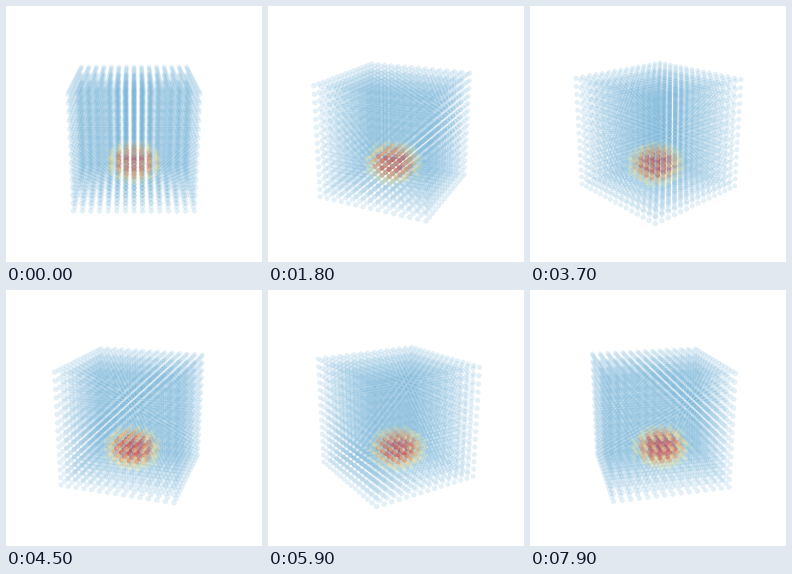
Write a matplotlib script that moves like this. It is 256 px wide and 256 px high and loops after 8 s.

```python
import numpy as np
import matplotlib.pyplot as plt
from matplotlib.animation import FuncAnimation
from matplotlib.colors import LinearSegmentedColormap

SIZE, DPI = 256, 100
FRAMES, INTERVAL = 80, 100
TURN = np.radians(3.6)            # rotation per frame
ELEV = np.arcsin(1 / 3)
DIST, FOCAL = 8.73, 490           # in half cube sides, in pixels
DOT = 5.0                         # dot diameter at the cube centre, pixels

# Cube lattice: x right, y towards the viewer, z up
axis = np.linspace(-1, 1, 15)
x, y, z = (g.ravel() for g in np.meshgrid(axis, axis, axis, indexing="ij"))

# Hot spot near the floor
q = np.sqrt((x / .5) ** 2 + ((y + .05) / .5) ** 2 + ((z + .55) / .36) ** 2)
heat = np.clip(1 - q / 1.12, 0, 1)
cmap = LinearSegmentedColormap.from_list("heat", [
    (0, "#6baed6"), (.04, "#d5eab0"), (.16, "#fee58f"), (.3, "#fdae61"),
    (.45, "#ee6545"), (.7, "#d53e4f"), (1, "#a8123f")])
colors = cmap(heat)
colors[:, 3] = np.where(heat > 0, .3 + .5 * np.minimum(heat / .5, 1), .18)


def project(angle):
    """Screen position, depth and scale of every point."""
    ca, sa = np.cos(angle), np.sin(angle)
    ce, se = np.cos(ELEV), np.sin(ELEV)
    u, v = x * ca + y * sa, y * ca - x * sa
    depth = DIST - v * ce - z * se
    k = FOCAL / depth
    return SIZE / 2 + k * u, SIZE / 2 + k * (z * ce - v * se), depth


fig = plt.figure(figsize=(SIZE / DPI, SIZE / DPI), dpi=DPI, facecolor="white")
ax = fig.add_axes([0, 0, 1, 1])
ax.set(xlim=(0, SIZE), ylim=(0, SIZE))
ax.axis("off")
dots = ax.scatter(x, y, s=1, linewidths=0)


def update(i):
    px, py, depth = project(i * TURN)
    order = np.argsort(-depth, kind="stable")
    dots.set_offsets(np.column_stack([px, py])[order])
    dots.set_sizes((DOT * 72 / DPI * DIST / depth[order]) ** 2)
    dots.set_facecolors(colors[order])
    return dots,


anim = FuncAnimation(fig, update, frames=FRAMES, interval=INTERVAL,
                     repeat=True, repeat_delay=0)
plt.show()
```
